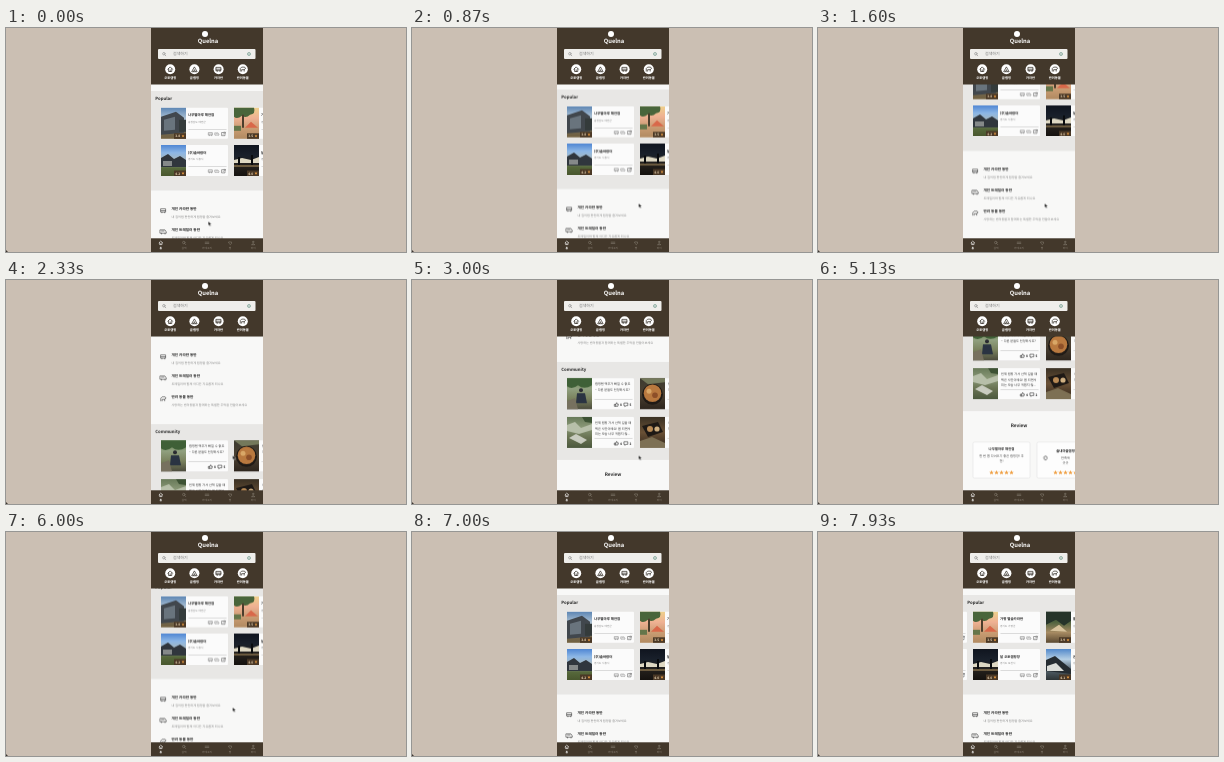
These frames come from a looping animation (400x224 px, 8 s). An HTML page:

```html
<!DOCTYPE html>
<html lang="ko">
<head>
<meta charset="utf-8">
<title>Camping app</title>
<style>
html, body { margin: 0; width: 100%; height: 100%; overflow: hidden; background: #cbbfb3; }
svg { display: block; width: 400px; height: 224px; }
text {
  font-family: "Noto Sans CJK KR", "Noto Sans CJK", "Noto Sans", sans-serif;
  dominant-baseline: central;
  text-rendering: geometricPrecision;
}
.line { fill: none; stroke-width: .6; stroke-linejoin: round; stroke-linecap: round; }
#page { animation: scroll 8s infinite; }
#slide { animation: slide 8s infinite; }
#cursor { animation: cursor 8s infinite; }
#arrow { animation: arrow 8s step-end infinite; }
#hand { animation: hand 8s step-end infinite; }

@keyframes scroll {
  0%, 9.1% { transform: translateY(0); animation-timing-function: cubic-bezier(.33, 0, .67, .49); }
  20% { transform: translateY(-39.5px); animation-timing-function: cubic-bezier(.33, .25, .67, .73); }
  37.5% { transform: translateY(-168px); animation-timing-function: cubic-bezier(.33, .53, .67, 1); }
  51% { transform: translateY(-217px); }
  64% { transform: translateY(-217px); animation-timing-function: cubic-bezier(.33, 0, .67, .94); }
  75% { transform: translateY(-15.5px); animation-timing-function: cubic-bezier(.33, .6, .67, 1); }
  84%, 100% { transform: translateY(0); }
}
@keyframes slide {
  0%, 92% { transform: translateX(0); animation-timing-function: ease; }
  98.8%, 100% { transform: translateX(-73px); }
}
@keyframes cursor {
  0%, .6% { transform: translate(202.3px, 193.3px); animation-timing-function: ease-in-out; }
  4.2%, 100% { transform: translate(226.6px, 175.3px); }
}
@keyframes arrow {
  0% { opacity: 1; }
  46% { opacity: 0; }
  66.5% { opacity: 1; }
  84.5%, 100% { opacity: 0; }
}
@keyframes hand {
  0% { opacity: 0; }
  46% { opacity: 1; }
  66.5%, 100% { opacity: 0; }
}
</style>
</head>
<body>
<svg id="stage" viewBox="0 0 400 224" xmlns="http://www.w3.org/2000/svg"></svg>
<script>
const DARK = '#43382b', INK = '#222', GREY = '#8b8b8b', ORANGE = '#f0a044';

const rect = (x, y, w, h, fill, extra = '') =>
  `<rect x="${x}" y="${y}" width="${w}" height="${h}" fill="${fill}" ${extra}/>`;
const circle = (x, y, r, fill, extra = '') =>
  `<circle cx="${x}" cy="${y}" r="${r}" fill="${fill}" ${extra}/>`;
const path = (d, fill) => `<path d="${d}" fill="${fill}"/>`;
const text = (x, y, size, str, fill = INK, weight = 400, anchor = 'start') =>
  `<text x="${x}" y="${y}" font-size="${size}" fill="${fill}" font-weight="${weight}" text-anchor="${anchor}">${str}</text>`;
const at = (x, y, content) => `<g transform="translate(${x} ${y})">${content}</g>`;

// Line icons, centred on their own origin
const shapes = {
  search: 'M1.1 1.1L2 2M1.3-.3A1.4 1.4 0 1 1-1.5-.3A1.4 1.4 0 1 1 1.3-.3',
  home: 'M-2 0L0-2L2 0M-1.4-.3V2H1.4V-.3M0 2V.6',
  tent: 'M-2.2 1.9L0-2L2.2 1.9ZM-.7 1.9L0 .4L.7 1.9',
  van: 'M-2.6-1.6H1.4L2.6.2V1.3H-2.6ZM-1.5-.6H.6M-1.5 1.3V2M1.5 1.3V2',
  bus: 'M-2-1.6H2V1.3H-2ZM-2 0H2M-1.2 1.3V1.9M1.2 1.3V1.9',
  pet: 'M-2.2 1.7V-.6L-1-1.8H1.6L2.4-.6L1.2.3V1.7M-1 1.7V.4H1.2',
  grid: 'M-2-.7H2M-2 .8H2',
  heart: 'M0 1.8L-1.8 0Q-2-1.7 0-.9Q2-1.7 1.8 0Z',
  user: 'M-1.6 1.8Q0-.6 1.6 1.8ZM.8-1A.8.8 0 1 1-.8-1A.8.8 0 1 1 .8-1',
  share: 'M.4-1.5H-1.7V1.7H1.7V0M0 .3L2-1.8M.8-1.8H2V-.6',
  thumb: 'M-1.8-.2H-.8V1.7H-1.8ZM-.8-.2L.2-1.9L.7-.4H1.9L1.4 1.7H-.8',
  talk: 'M-1.7-1.5H1.8V1.1H0L-1.2 2V1.1H-1.7Z'
};
const icon = (name, x, y, color = '#777', scale = 1) =>
  `<path class="line" d="${shapes[name]}" stroke="${color}" transform="translate(${x} ${y}) scale(${scale})"/>`;

const star = (x, y, r) => {
  const points = Array.from({ length: 10 }, (_, i) => {
    const a = i * Math.PI / 5 - Math.PI / 2, d = i % 2 ? r * .45 : r;
    return `${(x + d * Math.cos(a)).toFixed(2)},${(y + d * Math.sin(a)).toFixed(2)}`;
  });
  return `<polygon points="${points.join(' ')}" fill="${ORANGE}"/>`;
};

// Pictures: a vertical gradient with a few flat shapes, 25 x 31
let gradients = 0;
const photo = (colors, art) => {
  const id = 'sky' + gradients++;
  const stops = colors.map((c, i) => `<stop offset="${i / (colors.length - 1)}" stop-color="${c}"/>`).join('');
  return `<linearGradient id="${id}" x2="0" y2="1">${stops}</linearGradient>` +
    rect(0, 0, 25, 31, `url(#${id})`) + art;
};

const photos = {
  cabin: photo(['#5d86b4', '#a9bfd2', '#6f6a58', '#72603f'],
    path('M0 9L15 4L23 10V25L0 27Z', '#41474d') + path('M3 12L14 9V22L3 23Z', '#69747d') +
    path('M18 12H25V24H18Z', '#343b3b')),
  lodge: photo(['#4f86d3', '#8db7e6', '#a9b8bb', '#56683b', '#49572e'],
    path('M0 13L7 9L13 14L19 11L25 15V22H0Z', '#30363d') + path('M2 16H11V21H2Z', '#858989')),
  sunset: photo(['#eed08c', '#efb193', '#c99c73', '#b18a61'],
    path('M0 0H20Q22 6 16 7Q12 11 8 8Q3 12 0 9Z', '#49653b') + path('M8 7H10V20H8Z', '#4b3d2c') +
    path('M11 20L17 14L24 20Z', '#d9684a') + path('M0 18H7V23H0Z', '#65764a')),
  night: photo(['#10151f', '#19202b', '#25211d', '#15120f'],
    path('M0 15L8 13L17 15L25 12V18H0Z', '#ded8c3') + path('M0 20H25V22H0Z', '#6b5a3e') +
    path('M4 12H6V20H4ZM17 10H19V20H17Z', '#090b0e')),
  woods: photo(['#31402e', '#50633f', '#a68a62', '#5a4932'],
    path('M0 0H25V9L18 14L10 8L0 13Z', '#26342a') + path('M4 19L13 13L21 20Z', '#d7c29b')),
  ridge: photo(['#5289cb', '#b5cfe4', '#54616a', '#2d3435'],
    path('M0 11L9 7L25 20V25L0 22Z', '#252c31') + path('M1 17L10 14L18 22H1Z', '#dadcd8')),
  hiker: photo(['#5c7d46', '#91a180', '#7a825e', '#4b4b3d'],
    path('M0 0H25V7Q17 12 11 7Q5 12 0 8Z', '#3f6037') + circle(14, 12, 2, '#2a2b31') +
    path('M10 15H18L20 25H9Z', '#2a3342') + path('M0 23L8 20L11 31H0Z', '#77715f')),
  flowers: photo(['#687a59', '#8a9877', '#687252', '#4c593e'],
    path('M0 8L8 5L14 11L25 7V13L12 17L0 14Z', '#b7bfa9') + path('M2 21L9 17L20 23L14 27Z', '#c9ccc0') +
    path('M15 0H25V6L18 5Z', '#3d5234')),
  stew: photo(['#3c3a30', '#4c4132', '#2e261e'],
    circle(12.5, 16, 10.5, '#1f1a16') + circle(12.5, 15, 8.8, '#b9793f') +
    circle(9, 13, 2.5, '#d9a767') + circle(15, 17, 2.8, '#8d4f28') + path('M0 0H25V4L8 6Z', '#74795b')),
  grill: photo(['#3a3124', '#6a5136', '#2f251c'],
    path('M2 9L18 5L23 15L8 20Z', '#1e1915') + circle(10, 12, 3, '#b88a55') +
    circle(17, 12, 2.6, '#d0b183') + path('M0 24L12 20L25 26V31H0Z', '#7d7054'))
};

const card = (picture, body) =>
  rect(0, 0, 67, 31, '#fbfbfb', 'rx="1"') + photos[picture] + body +
  rect(27.5, 21.3, 38, .4, '#aaa');

const place = (picture, rating, name, area) => card(picture,
  rect(13, 25.5, 12, 5.5, '#4a3826') + text(14.3, 28.2, 3.2, rating, '#f5dfbd', 700) + star(22, 28.2, 1.5) +
  text(27, 7, 3.45, name, INK, 700) + text(27, 14, 2.65, area, GREY) +
  icon('bus', 49.5, 26.2, '#888', .9) + icon('van', 56, 26.2, '#888', .75) + icon('share', 62.3, 26.2, '#666'));

const post = (picture, lines, likes, replies) => card(picture,
  lines.map((line, i) => text(28, 5.6 + i * 5.4, 3.15, line, '#333', 500)).join('') +
  icon('thumb', 49.5, 26.3, '#333') + text(53, 26.3, 3.2, likes, INK, 700) +
  icon('talk', 59, 26.3, '#333') + text(62.4, 26.3, 3.2, replies, INK, 700));

const perk = (y, name, title, detail) =>
  icon(name, 157.3, y + 1.3, '#555', 1.15) + text(165.5, y, 3.6, title, INK, 700) +
  text(165.5, y + 6.8, 3.1, detail, GREY);

const review = (x, title, titleY, lines) => at(x, 379,
  rect(0, 0, 57, 36, '#fdfdfd', 'rx="1.5" stroke="#dedede" stroke-width=".5"') +
  text(28.5, titleY, 3.4, title, INK, 700, 'middle') +
  lines.map((line, i) => text(28.5, titleY + 7 + i * 5.4, 3.2, line, '#444', 400, 'middle')).join('') +
  [0, 1, 2, 3, 4].map(i => star(18.5 + i * 5, 30.5, 2.4)).join(''));

const places = [
  ['cabin', '3.8', '나무별마루 해안점', '충청남도 태안군'], ['lodge', '4.2', '(주)솔바람터', '경기도 시흥시'],
  ['sunset', '3.5', '가평 별숲카라반', '경기도 가평군'], ['night', '4.0', '달 오토캠핑장', '경기도 포천시'],
  ['woods', '3.9', '들꽃 캠핑마을', '강원도 홍천군'], ['ridge', '4.1', '은하 글램핑장', '강원도 평창군']
];
const posts = [
  ['hiker', ['캠핑엔 맥주가 빠질 수 없죠', '~ 다른 분들도 인정하시죠?'], 8, 5],
  ['flowers', ['인제 캠핑 가서 산책 길을 때', '찍은 사진이에요! 봄 되면서', '피는 모습 너무 귀엽지 않...'], 4, 2],
  ['stew', ['캠핑 요리는 역시 찌개가', '최고인 것 같아요'], 6, 3],
  ['grill', ['오늘 저녁은 숯불구이로', '정했습니다'], 5, 1]
];
const columns = (items, draw, top, pitch) => items.map((item, i) =>
  at(155 + Math.floor(i / 2) * 73, top + i % 2 * pitch, draw(...item))).join('');

const page =
  rect(145, 56, 112, 390, '#f8f8f7') +
  rect(145, 63, 112, 99.5, '#e8e7e5') + text(149.3, 71.2, 4.3, 'Popular', INK, 700) +
  `<g id="slide">${columns(places, place, 79.8, 37.2)}</g>` +
  perk(181.3, 'bus', '개인 카라반 동반', '내 집처럼 편안하게 캠핑을 즐겨보세요') +
  perk(202.4, 'van', '개인 트레일러 동반', '트레일러와 함께 어디든 자유롭게 떠나요') +
  perk(223.5, 'pet', '반려 동물 동반', '사랑하는 반려동물과 함께하는 특별한 추억을 만들어보세요') +
  rect(145, 250, 112, 98, '#e8e7e5') + text(149.3, 258, 4.3, 'Community', INK, 700) +
  columns(posts, post, 266.3, 38.7) +
  text(201, 363.2, 4.7, 'Review', INK, 700, 'middle') +
  review(155, '나무별마루 해안점', 6, ['한 번 쯤 다녀오기 좋은 캠핑장! 추', '천!']) +
  review(219, '솔내마을캠핑', 8, ['만족욱', '굿굿']);

const menu = [['home', '오토캠핑'], ['tent', '글램핑'], ['bus', '카라반'], ['pet', '반려동물']];
const header =
  rect(145, 0, 112, 56.5, DARK) +
  circle(199, 6, 3, '#fff') + text(202, 12.4, 5.8, 'Quelna', '#fff', 700, 'middle') +
  rect(152, 21, 97.5, 10, '#efeeeb', 'rx="1"') + icon('search', 158, 26, '#777', .9) +
  text(167, 26, 4, '검색하기', '#777') +
  circle(243, 26, 1.5, 'none', 'stroke="#6f9a8c" stroke-width=".7"') + circle(243, 26, .6, '#6f9a8c') +
  menu.map(([name, label], i) => {
    const x = 164.2 + i * 24.2;
    return circle(x, 41.2, 5, '#fff') + icon(name, x, 41.2, '#2a241d', 1.15) +
      text(x, 49.6, 3.3, label, '#fff', 700, 'middle');
  }).join('');

const tabs = [['home', '홈'], ['search', '검색'], ['grid', '카테고리'], ['heart', '찜'], ['user', '마이']];
const footer = rect(145, 210.3, 112, 13.7, DARK) +
  tabs.map(([name, label], i) => {
    const x = 154.8 + i * 23.1, color = i ? '#8b8276' : '#fff';
    return icon(name, x, 214.8, color, .9) + text(x, 220, 2.7, label, color, i ? 400 : 700, 'middle');
  }).join('');

const cursor = `<g id="cursor">
  <path id="arrow" d="M0 0V4.2L1 3.4L1.7 4.9L2.5 4.5L1.8 3.1H3.1Z" fill="#111" stroke="#fff" stroke-width=".35"/>
  <path id="hand" d="M-.6 1.6L.2.8L2 1.2L2.4 3.2L1.4 4.6H.3L-.7 3Z" fill="#fff" stroke="#222" stroke-width=".6"/>
</g>`;

document.getElementById('stage').innerHTML =
  '<clipPath id="screen"><rect x="145" y="0" width="112" height="224"/></clipPath>' +
  rect(0, 0, 400, 224, '#cbbfb3') + path('M0 222V224H2Z', '#3a342e') +
  `<g clip-path="url(#screen)"><g id="page">${page}</g>${header}${footer}</g>` + cursor;
</script>
</body>
</html>
```
